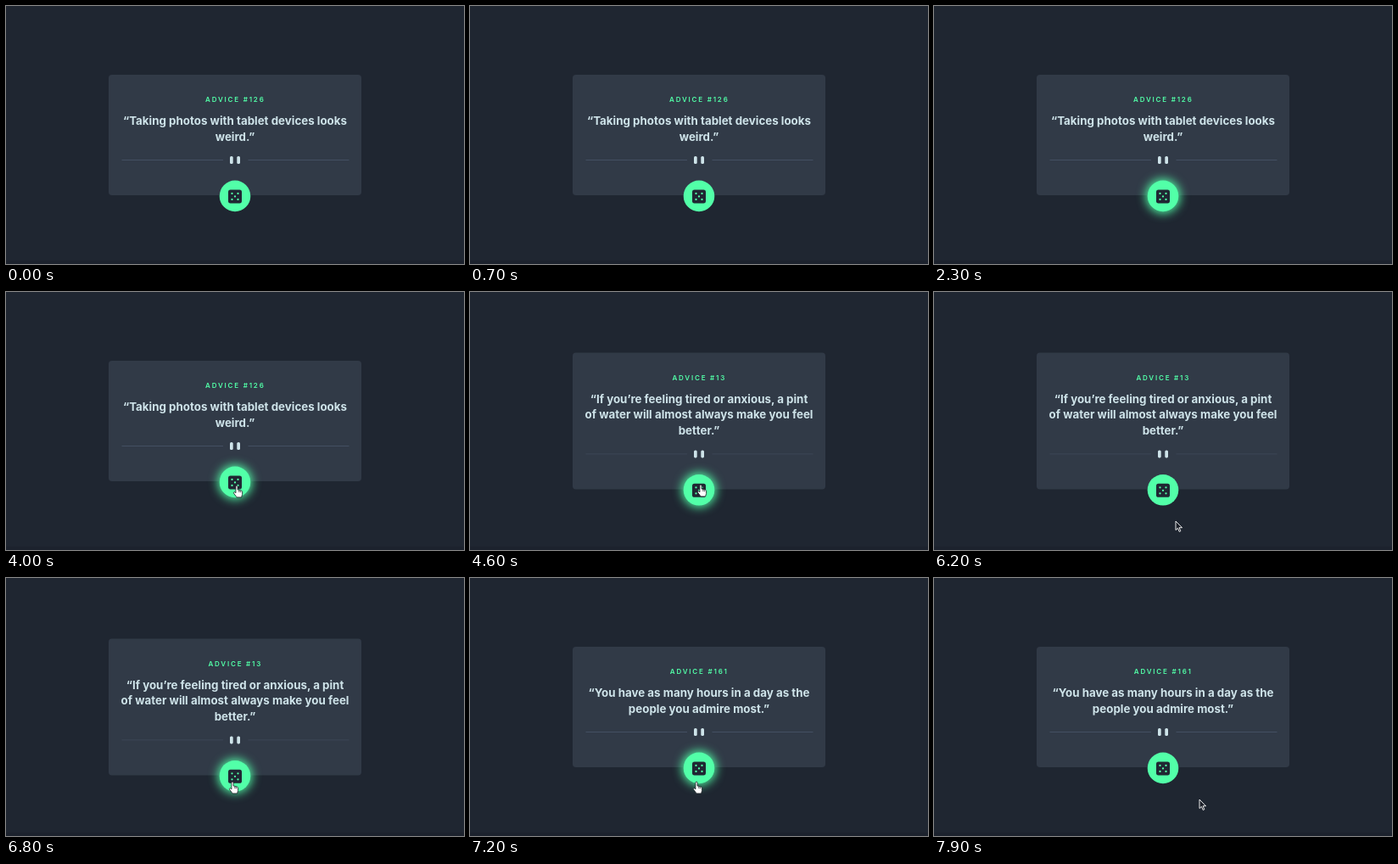
An HTML page for the animation above (8 s loop, 540 by 304 pixels).

```html
<!DOCTYPE html>
<html lang="en">
<head>
<meta charset="utf-8">
<title>Advice generator</title>
<style>
  html, body { margin: 0; width: 100%; height: 100%; overflow: hidden; background: #1f2631; }
  svg { display: block; width: 100%; height: 100%; }
  text { font-family: Inter, sans-serif; font-weight: 700; text-anchor: middle; }
  #title { font-size: 8px; font-weight: 600; letter-spacing: 1.8px; fill: #52ffa8; }
  .quote { font-size: 13.35px; fill: #cee3e9; }
  #glow { filter: blur(6px); }
</style>
</head>
<body>
<svg viewBox="0 0 540 304">
  <rect y="300" width="540" height="4" fill="#1c222d"/>
  <rect id="card" x="121" width="298" rx="4" fill="#313a47"/>
  <g id="top">
    <text id="title" x="270.300" y="32"></text>
    <text class="quote" x="270" y="59"></text>
    <text class="quote" x="270" y="77.700"></text>
    <text class="quote" x="270" y="96.400"></text>
  </g>
  <g id="bottom">
    <path id="rule" d="M136.500-41.500H256M285.500-41.500H404.500" stroke="#4f5d74"/>
    <g fill="#cee3e9">
      <rect x="264" y="-46" width="3.700" height="9" rx="1.600"/>
      <rect x="272.300" y="-46" width="3.700" height="9" rx="1.600"/>
    </g>
    <g transform="translate(270 .9)">
      <circle id="glow" r="20" fill="#52ffa8"/>
      <circle r="18.300" fill="#52ffa8"/>
      <rect x="-8" y="-7.500" width="16" height="16" rx="2.600" fill="#202733"/>
      <path d="M-3.500-3h0M3.500-3h0M0 .5h0M-3.500 4h0M3.500 4h0"
            stroke="#52ffa8" stroke-width="2.300" stroke-linecap="round"/>
    </g>
  </g>
  <g id="cursor" stroke-linejoin="round">
    <path id="hand" fill="#fff" stroke="#14181f" stroke-width=".8"
          d="M-1.100 1.200a1.100 1.100 0 0 1 2.200 0V5l4 .9c1.200.3 1.500 1 1.500 2v2.500l-1 3.500h-5.500l-3.500-4.700c-.6-1.200.6-2 1.500-1.200l.8.8zM2.900 6v2M4.700 6.400v1.800"/>
    <path id="arrow" fill="#1b1f28" stroke="#fff" stroke-width=".9"
          d="M0 0V10.500L2.400 8.300 4.200 12.400 5.800 11.700 4.100 7.700H7.500Z"/>
  </g>
</svg>
<script>
const LOOP = 8000, STEP = 100, REACH = 18.3;
const $ = id => document.getElementById(id);
const lines = document.querySelectorAll('.quote');

const advices = [
  { at: 0, id: 126, top: 81, bottom: 223, rule: .6,
    text: ['“Taking photos with tablet devices looks', 'weird.”'] },
  { at: 4600, id: 13, top: 71.6, bottom: 232.4, rule: .35,
    text: ['“If you’re feeling tired or anxious, a pint', 'of water will almost always make you feel', 'better.”'] },
  { at: 7200, id: 161, top: 81, bottom: 223, rule: .6,
    text: ['“You have as many hours in a day as the', 'people you admire most.”'] }
];

// Pointer tip: time, x, y
const path = [
  [4000, 272, 228], [4500, 272, 228], [4600, 272, 227], [5400, 272, 227],
  [5500, 275, 238], [5600, 284, 258], [5800, 293, 276], [5900, 293, 276],
  [6200, 285, 270], [6500, 271, 248], [6800, 267, 240], [7200, 267, 240],
  [7300, 276, 250], [7500, 301, 263], [7700, 314, 260], [7800, 314, 260],
  [7900, 313, 261]
];

const ramp = (t, from, to) => Math.min(1, Math.max(0, (t - from) / (to - from)));

function pointerAt(t) {
  const next = path.findIndex(p => p[0] > t);
  if (next < 0) return path.at(-1).slice(1);
  const a = path[next - 1], b = path[next], k = ramp(t, a[0], b[0]);
  return [a[1] + (b[1] - a[1]) * k, a[2] + (b[2] - a[2]) * k];
}

function showAdvice(advice) {
  $('title').textContent = 'ADVICE #' + advice.id;
  lines.forEach((line, i) => line.textContent = advice.text[i] || '');
  $('card').setAttribute('y', advice.top);
  $('card').setAttribute('height', advice.bottom - advice.top);
  $('top').setAttribute('transform', `translate(0 ${advice.top})`);
  $('bottom').setAttribute('transform', `translate(0 ${advice.bottom})`);
  $('rule').setAttribute('opacity', advice.rule);
}

function showPointer(t, buttonY) {
  const visible = t >= path[0][0];
  $('cursor').setAttribute('visibility', visible ? 'visible' : 'hidden');
  if (!visible) return;
  const [x, y] = pointerAt(t);
  const over = Math.hypot(x - 270, y - buttonY) < REACH;
  $('cursor').setAttribute('transform', `translate(${x} ${y})`);
  $('hand').style.display = over ? '' : 'none';
  $('arrow').style.display = over ? 'none' : '';
}

function draw(now) {
  const t = Math.floor(now % LOOP / STEP) * STEP;
  const advice = advices.findLast(a => a.at <= t);
  showAdvice(advice);
  showPointer(t, advice.bottom + .9);
  const hover = ramp(t, 2000, 2300) - ramp(t, 5500, 5800) + ramp(t, 6500, 6800) - ramp(t, 7200, 7500);
  $('glow').setAttribute('opacity', hover);
  requestAnimationFrame(draw);
}
draw(0);
</script>
</body>
</html>
```
